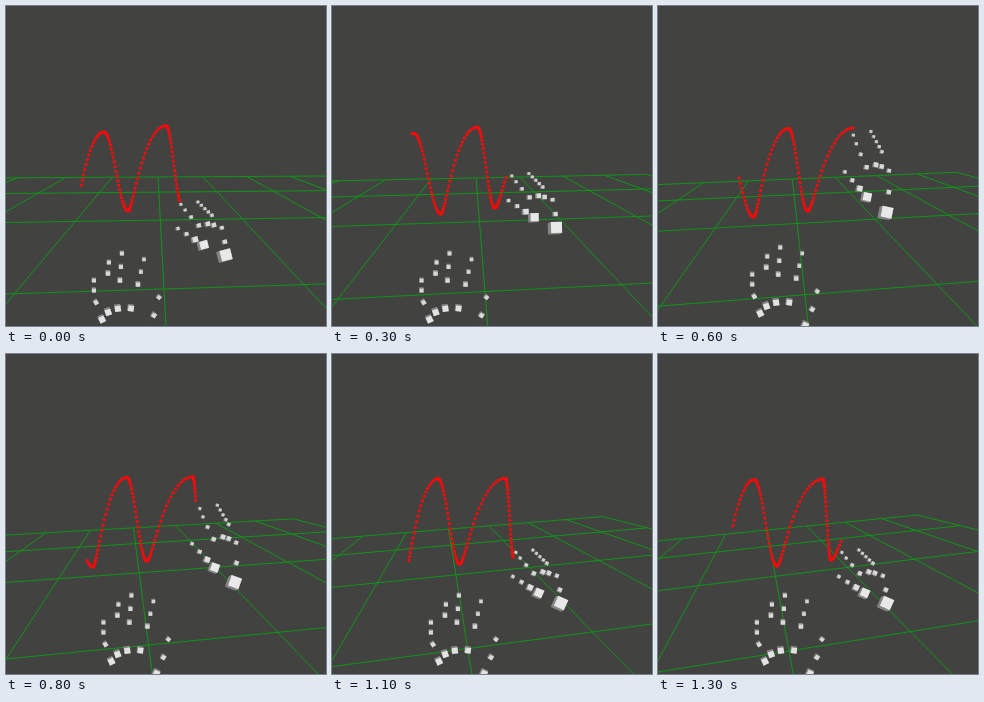
Recreate the animation shown at these times as an HTML page with a canvas. Size 320 px wide and 320 px high, loop 1500 ms.

```html
<!DOCTYPE html>
<html lang="en">
<head>
<meta charset="utf-8">
<title>Wave over a grid</title>
<style>
html, body { margin: 0; width: 100%; height: 100%; overflow: hidden; background: #424341; }
canvas { display: block; width: 100vw; height: 100vh; }
</style>
</head>
<body>
<canvas id="stage" width="320" height="320"></canvas>
<script>
const ctx = document.getElementById('stage').getContext('2d');
const LOOP = 1500, STEP = 100, LAST = 1300;

// Four grid crossings (far left, far right, near right, near left) at both ends of the loop
const GRID_START = [[152, 171], [326, 170], [669, 267], [158, 283]];
const GRID_END = [[109, 176], [259, 161], [544, 231], [131, 297]];

// Fingers: start x, y, end x, y, bend, cubes, first size, last size
const LEFT = [
  [99, 269, 101, 291, -1, 3, 4.5, 5],
  [114, 251, 113, 262, 0, 2, 4.5, 5],
  [127, 242, 125, 269, 0, 3, 4.5, 5],
  [149, 248, 143, 273, 0, 3, 4, 5],
  [164, 286, 152, 320, 1, 3, 4.5, 7],
  [107, 308, 136, 297, -4, 4, 7, 6.5]
];
const RIGHT = [
  [201, 175, 215, 192, 0, 5, 3, 3.5],
  [184, 178, 202, 205, -2, 4, 3, 4.5],
  [211, 203, 225, 208, -1, 3, 5, 4],
  [181, 209, 207, 230, 0, 4, 3.5, 9],
  [228, 226, 229, 243, 0, 2, 4.5, 12]
];

const mix = (a, b, f) => a + (b - a) * f;
const ramp = (t, from, to) => Math.min(1, Math.max(0, (t - from) / (to - from)));
const bump = (t, from, to) => Math.sin(Math.PI * ramp(t, from, to)) ** 2;

// Projective map from the unit square to a quad, as [x, y, w]
function projector([[x0, y0], [x1, y1], [x2, y2], [x3, y3]]) {
  const ax = x1 - x2, ay = y1 - y2, bx = x3 - x2, by = y3 - y2;
  const sx = x0 - x1 + x2 - x3, sy = y0 - y1 + y2 - y3;
  const det = ax * by - bx * ay;
  const g = (sx * by - bx * sy) / det, h = (ax * sy - sx * ay) / det;
  return (u, v) => [
    (x1 - x0 + g * x1) * u + (x3 - x0 + h * x3) * v + x0,
    (y1 - y0 + g * y1) * u + (y3 - y0 + h * y3) * v + y0,
    g * u + h * v + 1
  ];
}

function drawGrid(t) {
  const f = (t / LAST) ** 1.15;
  const map = projector(GRID_START.map((p, n) => p.map((c, axis) => mix(c, GRID_END[n][axis], f))));
  const near = .05;

  function line(a, b) {
    if (a[2] < b[2]) [a, b] = [b, a];
    if (a[2] < near) return;
    if (b[2] < near) {
      const cut = (a[2] - near) / (a[2] - b[2]);
      b = a.map((c, n) => mix(c, b[n], cut));
    }
    ctx.moveTo(a[0] / a[2], a[1] / a[2]);
    ctx.lineTo(b[0] / b[2], b[1] / b[2]);
  }

  ctx.beginPath();
  for (let n = 0; n <= 8; n++) {
    line(map(1 - n / 4, 0), map(1 - n / 4, 8 / 3));
    line(map(-1, n / 3), map(1, n / 3));
  }
  ctx.strokeStyle = '#0f9516';
  ctx.lineWidth = 1;
  ctx.stroke();
}

function drawCube(x, y, size, angle, dx, dy) {
  const front = [0, 1, 2, 3].map(n => {
    const a = angle + (n - 1.5) * Math.PI / 2 + Math.PI / 4;
    return [x + size * .707 * Math.cos(a + Math.PI / 4), y + size * .707 * Math.sin(a + Math.PI / 4)];
  });
  const back = front.map(([a, b]) => [a + dx * size, b + dy * size]);
  const face = (points, color) => {
    ctx.beginPath();
    points.forEach(p => ctx.lineTo(...p));
    ctx.closePath();
    ctx.fillStyle = color;
    ctx.fill();
  };
  front.forEach((p, n) => {
    const m = (n + 1) % 4;
    face([p, front[m], back[m], back[n]], '#858585');
  });
  const tone = Math.min(232, 190 + size * 6);
  face(front, `rgb(${tone}, ${tone}, ${tone})`);
}

function eachCube(fingers, visit) {
  for (const [x0, y0, x1, y1, bend, count, first, last] of fingers) {
    for (let n = 0; n < count; n++) {
      const f = n / (count - 1);
      const arch = bend * Math.sin(Math.PI * f);
      visit(mix(x0, x1, f) + arch, mix(y0, y1, f) + arch, mix(first, last, f * f), f);
    }
  }
}

function drawHands(t) {
  const lx = -11 * (1 - ramp(t, 200, 900)), ly = mix(5, -1, ramp(t, 300, 600));
  eachCube(LEFT, (x, y, size) => {
    const angle = y > 285 ? (x - 130) * .02 : 0;
    drawCube(x + lx, y + ly + .5, size * .88, angle, -.12, -.28);
  });

  // The right hand lifts, then its far cubes swing up a little later
  const lift = 6 - 45 * bump(t, 0, 1050);
  const swing = bump(t, 250, 1100);
  const rx = -9 * (1 - ramp(t, 0, 600));
  const tilt = mix(-.25, .42, ramp(t, 0, 900));
  eachCube(RIGHT, (x, y, size) => {
    const far = (243 - y) / 68;
    drawCube(x + rx + 13 * swing * far, y + lift + mix(15, -15, swing) * far,
      size * .92, tilt, -.28, .12);
  });
}

// Turning points of the wave: even are troughs, odd are crests
function turn(j, t) {
  return j % 2
    ? [67 + 31 * j - t * (.0565 - .0025 * j), 119 + 7 / (j * j) + .0045 * t]
    : [68 + 27 * j - t * .044, 211 - 3 * j + .01 * t];
}

function drawWave(t) {
  const from = .42 + .0016 * t + .14 * bump(t, 0, LAST), to = 3.85 + .0019 * t;
  const count = Math.round((to - from) * 26);
  ctx.fillStyle = '#f80a0a';
  for (let n = 0; n <= count; n++) {
    const u = mix(from, to, n / count), j = Math.floor(u), f = u - j;
    const [x0, y0] = turn(j, t), [x1, y1] = turn(j + 1, t);
    const lean = j % 2 ? 0 : .18 * Math.sin(Math.PI * f);
    const x = mix(x0, x1, f - lean);
    const y = mix(y0, y1, (1 - Math.cos(Math.PI * f)) / 2);
    ctx.fillRect(x - 1.4, y - 1.4, 2.8, 2.8);
  }
}

function draw(now) {
  const t = Math.min(LAST, Math.floor((now % LOOP) / STEP) * STEP);
  ctx.fillStyle = '#424341';
  ctx.fillRect(0, 0, 320, 320);
  drawGrid(t);
  drawHands(t);
  drawWave(t);
}

const start = performance.now();
function tick() {
  draw(performance.now() - start);
  requestAnimationFrame(tick);
}
tick();
</script>
</body>
</html>
```
